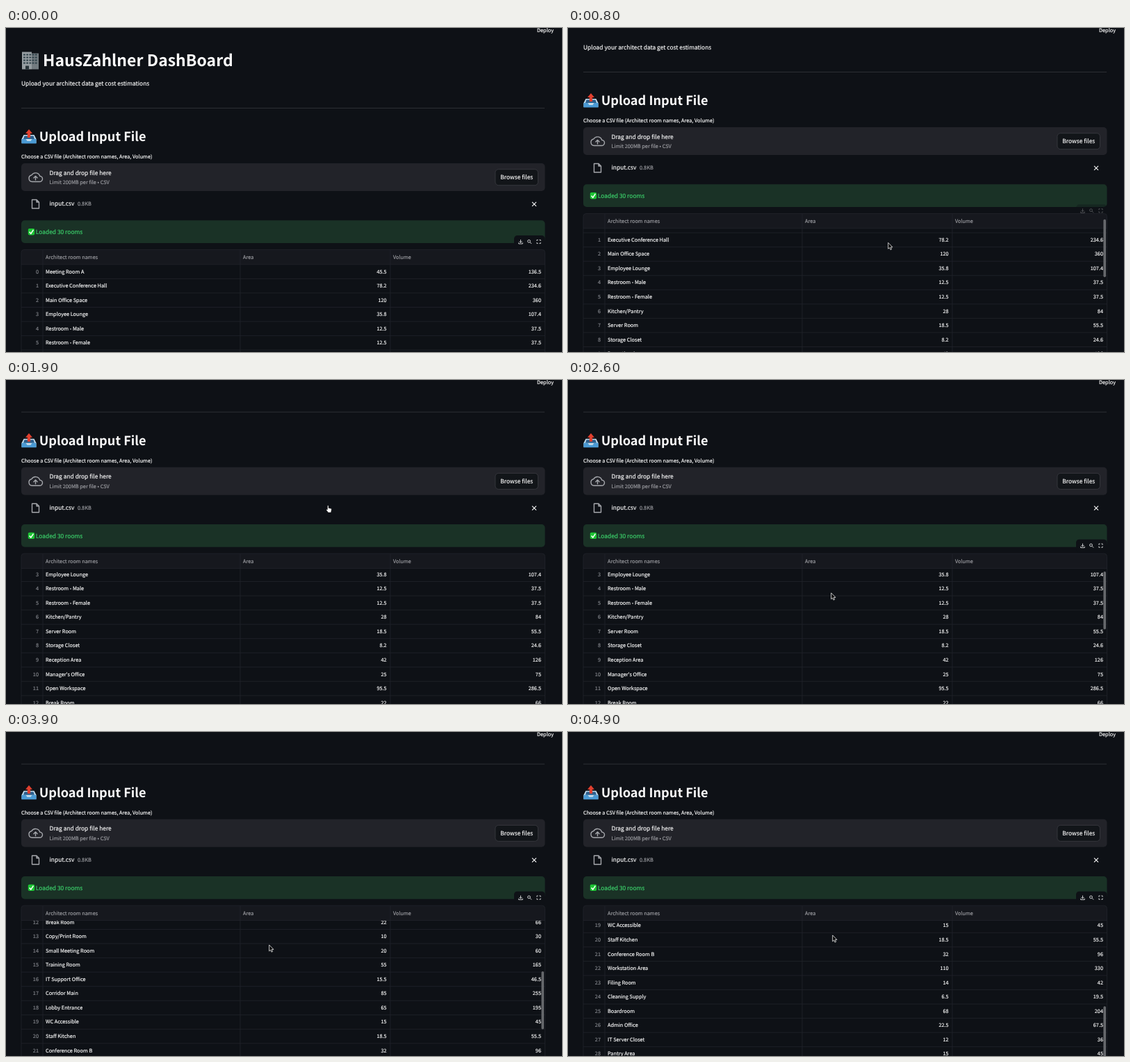
Recreate the animation shown at these times as an HTML page. Size 800 by 467 pixels, loop 5 s.

```html
<!DOCTYPE html>
<html lang="en">
<head>
<meta charset="utf-8">
<title>Cost dashboard</title>
<style>
  html, body { margin: 0; width: 100%; height: 100%; overflow: hidden; background: #0e1116; }
  svg { display: block; }
  text {
    font-family: "Noto Sans CJK JP", "Noto Sans CJK SC", "Noto Sans CJK", "Noto Sans", sans-serif;
    font-size: 7.34px; color: #fafafa; fill: currentColor;
    stroke: currentColor; stroke-width: .16; text-rendering: geometricPrecision;
  }
  .body { font-size: 8.42px; }
  .dim { color: #9b9ca1; }
  .index { color: #85878d; }
  .ok { color: #3dd56d; }
  .end { text-anchor: end; }
  .h1, .h2 { font-weight: 700; stroke: none; }
  .h1 { font-size: 23px; }
  .h2 { font-size: 18.2px; }
  .line { fill: none; stroke: #21242b; stroke-width: .8; }
  .icon { fill: none; stroke: #a5a7ac; stroke-width: 1.4; stroke-linejoin: round; stroke-linecap: round; }
  .tool { fill: none; stroke: #e4e5e6; stroke-width: .9; }
</style>
</head>
<body>
<svg width="800" height="467" viewBox="0 0 800 467">
  <defs>
    <clipPath id="bodyClip"><rect x="22" y="340.8" width="754" height="214"/></clipPath>
  </defs>
  <rect width="800" height="467" fill="#0e1116"/>

  <g id="page">
    <g transform="translate(23 34.5)">
      <rect width="14" height="25" fill="#969da1"/>
      <rect x="14" y="2" width="10" height="23" fill="#737b80"/>
      <path d="M2 4H23M2 8H23M2 12H23M2 16H23" stroke="#2f4149" stroke-width="2.2" stroke-dasharray="2.8 1.4"/>
      <rect x="5" y="20" width="5" height="5" fill="#273338"/>
    </g>
    <text class="h1" x="53" y="55.4">HausZahlner DashBoard</text>
    <text class="body" x="22" y="82.6">Upload your architect data get cost estimations</text>
    <path d="M22 115.5H775" stroke="#34363c" stroke-width=".8"/>

    <g transform="translate(22.5 146)">
      <path d="M3 8H18L21 14V20H0V14Z" fill="#c3dcec"/>
      <path d="M4 9.500H17L18.500 14H2.500Z" fill="#2b5f8c"/>
      <path d="M0 14H6L8 17H13L15 14H21V20.500H0Z" fill="#4a9ad4"/>
      <path d="M10.500 0L15.500 6H12.600V12H8.400V6H5.500Z" fill="#e0402f"/>
    </g>
    <text class="h2" x="47.700" y="163.400">Upload Input File</text>
    <text x="22" y="188">Choose a CSV file (Architect room names, Area, Volume)</text>

    <rect x="22" y="195" width="753.500" height="40" rx="5" fill="#222329"/>
    <g class="icon" transform="translate(42.500 215)">
      <path d="M-5 6.500a4.800 4.800 0 0 1-.6-9.500a6.500 6.500 0 0 1 11.800 1.500a4 4 0 0 1-.4 8Z"/>
      <path d="M0 4V-1.500M-2.600 1L0 -1.600L2.600 1"/>
    </g>
    <text class="body" x="62.500" y="211.600">Drag and drop file here</text>
    <text class="dim" x="62.500" y="225">Limit 200MB per file • CSV</text>
    <rect x="704" y="203.700" width="61.500" height="23" rx="4.700" fill="#121519" stroke="#3b3d43" stroke-width=".8"/>
    <text class="body" x="734.800" y="218.200" text-anchor="middle">Browse files</text>

    <path class="icon" transform="translate(37.500 247.500)" d="M0 0H6.500L10 3.500V12.500H0ZM6.500 0V3.500H10"/>
    <text class="body" x="62.500" y="256">input.csv</text>
    <text class="dim" x="103" y="255.900">0.8KB</text>
    <path transform="translate(760 253.900)" d="M-3 -3L3 3M3 -3L-3 3" stroke="#fafafa" stroke-width="1.100"/>

    <rect x="22" y="277.300" width="753.500" height="32.700" rx="5" fill="#1a3226"/>
    <g transform="translate(31.800 289)">
      <rect width="9.400" height="9.400" rx="1.800" fill="#1cc433"/>
      <path d="M1.800 4.800L4 7.400L7.600 1.900" fill="none" stroke="#fff" stroke-width="1.500"/>
    </g>
    <text class="body ok" x="42.800" y="296.900">Loaded 30 rooms</text>

    <g id="toolbar">
      <rect x="731" y="299" width="44.500" height="19" rx="4.700" fill="#0e1116"/>
      <g class="tool" transform="translate(740.500 308)">
        <path d="M0 -3V1M-2 -.6L0 1.400L2 -.6M-2.800 1.300V3H2.800V1.300"/>
        <circle cx="12" cy="-.7" r="1.900"/>
        <path d="M13.400 .7L15.700 3"/>
        <rect x="23.400" y="-2.600" width="5.200" height="5.200" stroke-dasharray="1.600 2 1.600 0"/>
      </g>
    </g>

    <path d="M22 555V323.500Q22 319.500 26 319.500H771.500Q775.500 319.500 775.500 323.500V555Z" fill="#0e1116"/>
    <g clip-path="url(#bodyClip)"><g id="rows"></g></g>
    <path d="M22 340.800V323.500Q22 319.500 26 319.500H771.500Q775.500 319.500 775.500 323.500V340.800Z" fill="#16181e"/>
    <rect class="line" x="22" y="319.500" width="753.500" height="236" rx="4"/>
    <path class="line" d="M22 340.800H775.500M53 319.500V555M337 319.500V555M553 319.500V555"/>
    <text class="dim" x="57" y="332.900">Architect room names</text>
    <text class="dim" x="341" y="332.900">Area</text>
    <text class="dim" x="557" y="332.900">Volume</text>
    <rect id="thumb" x="770.400" width="3.600" height="83.500" rx="1.800" fill="#66686c"/>
  </g>

  <rect width="800" height="20" fill="#0e1116"/>
  <text x="764" y="6.200">Deploy</text>

  <g id="cursor">
    <path id="arrow" d="M.4 .4V9.300L2.400 7.500L3.700 10.600L5.300 9.900L4 6.900H6.700Z" fill="#0a0a0a" stroke="#f2f2f2" stroke-width=".8" stroke-linejoin="round"/>
    <path id="hand" d="M1.200 .9Q2 -.2 2.800 .9V4L6.300 4.800Q7.300 5.200 7.100 6.300L6.300 10.500H2.300L-.4 6.900Q-.4 5.700 .6 6L1.200 6.600Z" fill="#fff" stroke="#111" stroke-width=".5"/>
  </g>
</svg>

<script>
const LOOP = 5000, STEP = 100, ROW = 20.55, BODY_TOP = 340.8;
const $ = id => document.getElementById(id);

const csv = `Meeting Room A,45.5
Executive Conference Hall,78.2
Main Office Space,120
Employee Lounge,35.8
Restroom - Male,12.5
Restroom - Female,12.5
Kitchen/Pantry,28
Server Room,18.5
Storage Closet,8.2
Reception Area,42
Manager's Office,25
Open Workspace,95.5
Break Room,22
Copy/Print Room,10
Small Meeting Room,20
Training Room,55
IT Support Office,15.5
Corridor Main,85
Lobby Entrance,65
WC Accessible,15
Staff Kitchen,18.5
Conference Room B,32
Workstation Area,110
Filing Room,14
Cleaning Supply,6.5
Boardroom,68
Admin Office,22.5
IT Server Closet,12
Pantry Area,15`;

$("rows").innerHTML = csv.split("\n").map((line, i) => {
  const [name, area] = line.split(",");
  const top = BODY_TOP + i * ROW;
  const volume = +(area * 3).toFixed(1); // every room is 3 m high
  const cell = (x, value, style) => `<text class="${style}" x="${x}" y="${top + 12.7}">${value}</text>`;
  return cell(47, i, "index end") + cell(57, name, "") + cell(547.7, area, "end") +
    cell(770, volume, "end") + `<path class="line" d="M22 ${top + ROW}H775.5"/>`;
}).join("");

const linear = u => u;
const smooth = u => u * u * (3 - 2 * u);
const easeOut = u => 1 - (1 - u) ** 1.4;
const ramp = (t, from, to, ease = linear) =>
  ease(Math.min(1, Math.max(0, (t - from) / (to - from))));

const move = (id, x, y) => $(id).setAttribute("transform", `translate(${x} ${y})`);
const show = (id, on) => $(id).setAttribute("display", on ? "inline" : "none");

function render(t) {
  const page = 52 * ramp(t, 0, 600, smooth) + 17.3 * ramp(t, 1600, 1900);
  const scroll = 63.2 * ramp(t, 700, 1300, easeOut) + 86 * ramp(t, 2800, 3200) +
    105 * ramp(t, 3300, 3900) + 139 * ramp(t, 3900, 4900);
  move("page", 0, -page);
  move("rows", 0, -scroll);

  // Hovering the table brings up its toolbar and scrollbar.
  const hover = ramp(t, 750, 900) - ramp(t, 1400, 1600) + ramp(t, 2200, 2400);
  const tools = hover + 1 - ramp(t, 0, 300);
  move("toolbar", 0, 11 * (1 - tools));
  $("toolbar").setAttribute("opacity", tools);
  $("thumb").setAttribute("y", 322.5 + .361 * scroll);
  $("thumb").setAttribute("opacity", Math.min(1, 3 * hover));

  const away = ramp(t, 1300, 1600, smooth), back = ramp(t, 1900, 2300, smooth), nudge = ramp(t, 4200, 4500);
  move("cursor", 460.3 + away - 83 * back + 2 * nudge, 309 - 128.5 * away + 126 * back - 14 * nudge);
  const pointing = t >= 1600 && t < 2000;
  show("cursor", t > 0);
  show("arrow", !pointing);
  show("hand", pointing);
}

const start = performance.now();
function frame() {
  const t = (performance.now() - start) % LOOP;
  render(Math.floor(t / STEP) * STEP);
  requestAnimationFrame(frame);
}
frame();
</script>
</body>
</html>
```
